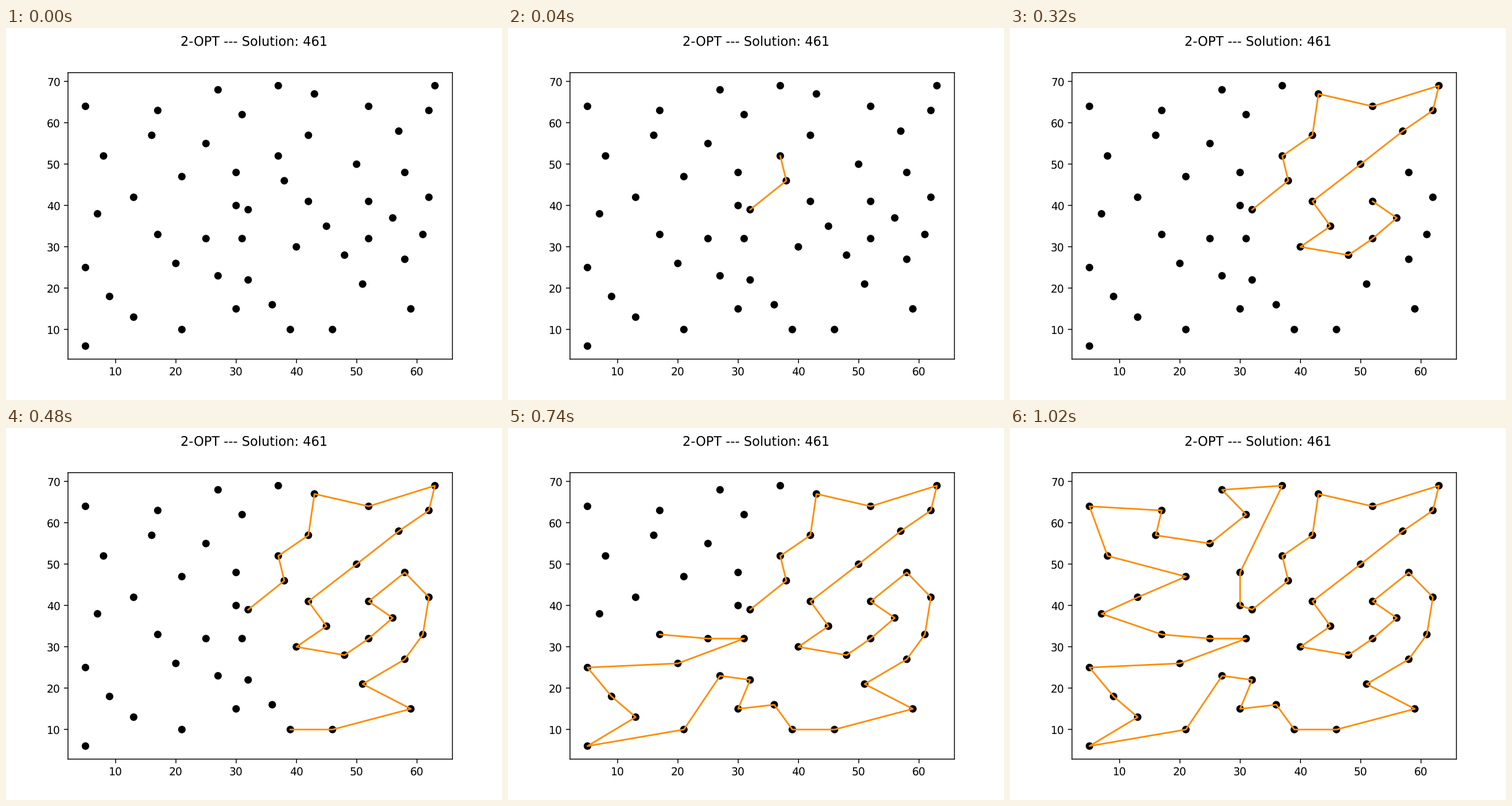
Write a matplotlib script that moves like this. It is 864 px wide and 648 px high and loops after 1.24 s.

```python
import numpy as np
import matplotlib.pyplot as plt
from matplotlib.animation import FuncAnimation
from matplotlib.collections import EllipseCollection

FRAMES, INTERVAL = 62, 20
FLASHES = {1, 26}
PAPER, GREY = "white", "#9c9c9c"
ROUTE, DARK = "darkorange", "#222222"
MID = None  # a city on the straight run between its two neighbours
DOT = 7     # points across

# Corners of the tour, in visiting order
corners = [
    (32, 39), (38, 46), (37, 52), (42, 57), (43, 67), (52, 64), (63, 69),
    (62, 63), (57, 58), MID, (42, 41), (45, 35), (40, 30), (48, 28),
    MID, (56, 37), (52, 41), (58, 48), (62, 42), (61, 33), (58, 27),
    (51, 21), (59, 15), (46, 10), (39, 10), (36, 16), (30, 15), (32, 22),
    (27, 23), (21, 10), (5, 6), (13, 13), MID, (5, 25), (20, 26),
    (31, 32), MID, (17, 33), (7, 38), MID, (21, 47), (8, 52),
    (5, 64), (17, 63), (16, 57), (25, 55), (31, 62), (27, 68), (37, 69),
    (30, 48), (30, 40),
]


def fill(points, t=0.45):
    """Put each MID city a share t along its run, on whole coordinates."""
    return np.array([
        p or np.rint((1 - t) * np.array(points[k - 1])
                     + t * np.array(points[k + 1]))
        for k, p in enumerate(points)])


tour = fill(corners)
loop = np.vstack([tour, tour[:1]])

plt.rcParams["text.hinting"] = "no_hinting"
fig, ax = plt.subplots(figsize=(6.4, 4.8), dpi=135)
fig.suptitle("2-OPT --- Solution: 461")
route, = ax.plot(*loop.T, lw=1.5, color=ROUTE, zorder=3)
ax.set_xlim(ax.get_xlim())
ax.set_ylim(ax.get_ylim())

# Ellipses keep sub-pixel centres, which plain markers round away
size = np.full(len(tour), DOT)
ax.add_collection(EllipseCollection(
    size, size, 0 * size, units="points", offsets=tour,
    offset_transform=ax.transData, facecolor="black", linewidth=0, zorder=2))
for spine in ax.spines.values():
    spine.set_snap(False)


def draw(i):
    """Add one leg of the tour per frame, then hold the closed loop."""
    legs = min(i, len(tour))
    route.set_data(*(loop[:legs + 1].T if legs else ([], [])))
    flash = i in FLASHES
    route.set_color(DARK if flash else ROUTE)
    for part in (fig, ax):
        part.set_facecolor(GREY if flash else PAPER)
    return route,


anim = FuncAnimation(fig, draw, frames=FRAMES, interval=INTERVAL,
                     init_func=lambda: draw(0), repeat=True, repeat_delay=0)
plt.show()
```
